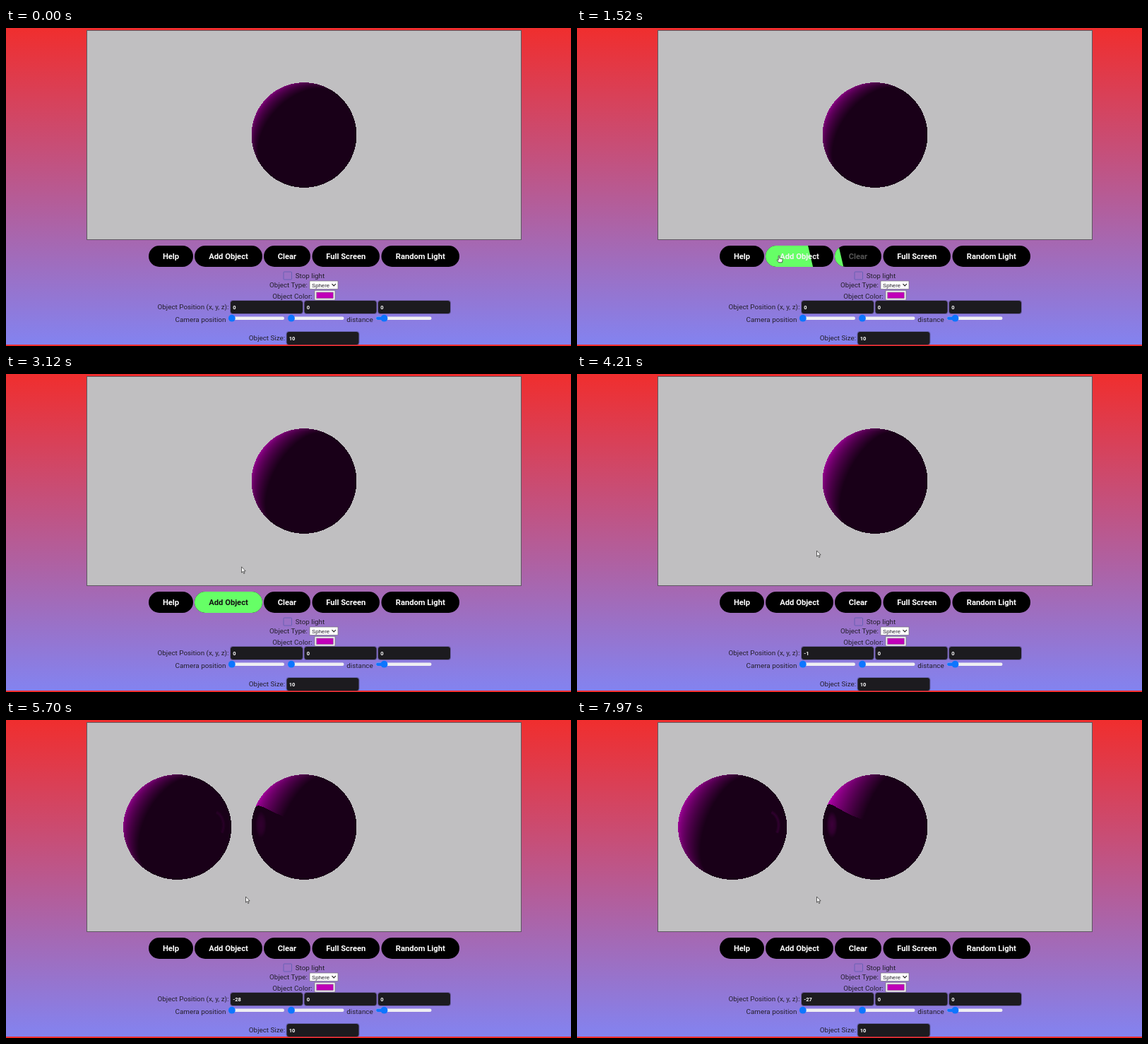
An HTML page with a canvas that plays this animation: 800 by 450 pixels, repeating every 8090 ms.

```html
<!DOCTYPE html>
<html lang="en">
<head>
<meta charset="utf-8">
<title>Sphere lighting demo</title>
<style>
  html, body { margin: 0; width: 100%; height: 100%; overflow: hidden; }
  body { background: linear-gradient(#f02e2e, #8383f0) 0 0 / 100% 448px; }
  canvas, svg { position: absolute; display: block; }
  canvas { left: 114px; top: 3px; background: #c0bfc1; border: 1px solid #5d5860; }
  svg { left: 0; top: 0; }
  text { font-family: Roboto, sans-serif; }
</style>
</head>
<body>
<canvas id="view" width="614" height="295"></canvas>
<svg id="ui" width="800" height="450" viewBox="0 0 800 450"></svg>
<script>
const LOOP = 8090;
const ui = document.getElementById('ui');
const ctx = document.getElementById('view').getContext('2d');

const clamp = v => Math.min(1, Math.max(0, v));
const ramp = (t, from, to) => clamp((t - from) / (to - from));

function add(tag, attrs, parent = ui, content) {
  const node = document.createElementNS('http://www.w3.org/2000/svg', tag);
  for (const key in attrs) node.setAttribute(key, attrs[key]);
  if (content !== undefined) node.textContent = content;
  parent.appendChild(node);
  return node;
}
const rect = (x, y, width, height, fill, more = {}) =>
  add('rect', { x, y, width, height, fill, ...more });
const text = (content, x, y, size, more = {}) =>
  add('text', { x, y, 'font-size': size, fill: '#241f2c', ...more }, ui, content);
const label = (content, center, y) =>
  text(content, center, y, 9.85, { 'text-anchor': 'middle' });

// Buttons with a slanted green fill
function makeButton(content, x, width, id) {
  const shape = { x, y: 308, width, height: 30, rx: 15 };
  add('rect', shape, add('clipPath', { id }));
  add('rect', { ...shape, fill: '#000' });
  const fill = add('path', { fill: '#66ff66', 'clip-path': `url(#${id})` });
  const caption = text(content, x + width / 2, 327, 11.2,
    { 'text-anchor': 'middle', 'font-weight': 700 });
  return (amount, lightness) => {
    const edge = x - 4 + amount * (width + 8);
    fill.setAttribute('d', amount > 0
      ? `M${x - 10} 308H${edge - 3.5}L${edge + 3.5} 338H${x - 10}Z` : '');
    const level = Math.round(18 + 237 * lightness);
    caption.setAttribute('fill', `rgb(${level},${level},${level})`);
  };
}
const helpButton = makeButton('Help', 202, 63, 'help');
const addButton = makeButton('Add Object', 267, 96, 'add');
const clearButton = makeButton('Clear', 365, 66, 'clear');
const fullButton = makeButton('Full Screen', 433.5, 95.5, 'full');
const randomButton = makeButton('Random Light', 531.5, 110.5, 'random');
for (const idle of [helpButton, fullButton, randomButton]) idle(0, 1);

// Form
rect(393, 345, 11.5, 11, 'none', { stroke: '#6860b4', rx: 1 });
label('Stop light', 430.5, 354);
label('Object Type:', 400, 366.5);
rect(430, 358, 40, 11.5, '#fff', { stroke: '#77727c', 'stroke-width': .7 });
text('Sphere', 433, 366.5, 7.8, { style: 'font-family: "Liberation Sans", sans-serif' });
add('path', { d: 'M461.5 362.2l2.7 2.7 2.7-2.7', fill: 'none', stroke: '#222', 'stroke-width': 1.2 });
label('Object Color:', 405.5, 382.5);
rect(437, 371.3, 29, 13.7, '#f0eff2', { stroke: '#77727c', 'stroke-width': .7 });
rect(439.7, 374, 23.6, 8.6, '#c000b8', { stroke: '#77727c', 'stroke-width': .5 });
label('Object Position (x, y, z):', 265, 398.3);
label('Camera position', 275.5, 415.8);
label('distance', 501, 415.8);
label('Object Size:', 369.5, 442);

function field(x, y, value) {
  rect(x - 1, y - 1, 104, 20, '#302c48', { rx: 4, opacity: .35 });
  rect(x, y, 102, 18, '#1c1b1f', { rx: 3.5 });
  return text(value, x + 3.3, y + 12.2, 7.5, { fill: '#fff', 'font-weight': 700 });
}
const xField = field(318, 386, '0');
field(422.5, 386, '0');
field(527, 386, '0');
field(397.5, 430, '10');

function slider(x, thumb) {
  rect(x, 408.5, 78.5, 4.4, '#efeff2', { rx: 2.2 });
  rect(x, 408.5, thumb - x, 4.4, '#0d75ff', { rx: 2.2 });
  add('circle', { cx: thumb, cy: 410.7, r: 4.9, fill: '#0d75ff' });
}
slider(315.5, 319.8);
slider(400, 404);
slider(524, 535.5);

// Pointer
const outline = { fill: '#fff', stroke: '#222', 'stroke-width': .7, 'stroke-linejoin': 'round' };
const arrow = add('path', { ...outline, d: 'M0 0V8.2L1.9 6.5 3.2 9.6 4.5 9 3.2 6H5.7Z' });
const hand = add('path', { ...outline,
  d: 'M-.8 .6Q0-.6 .8 .6V4L4.4 4.8Q5.3 5 5.1 6.2L4.4 9.8H-.2L-3 6.6Q-2.6 5.2-.8 6.6Z' });
const route = [[60, 800, 436], [400, 610, 395], [760, 486, 369], [1050, 421, 334],
  [1300, 363, 326], [1520, 286, 322], [2450, 286, 322], [2780, 330, 393],
  [3120, 333.5, 273], [3270, 339.5, 250], [LOOP, 339.5, 250]];

function movePointer(t) {
  const next = route.findIndex(stop => stop[0] > t);
  const visible = next > 0;
  let x = 0, y = 0;
  if (visible) {
    const [t0, x0, y0] = route[next - 1], [t1, x1, y1] = route[next];
    const k = (t - t0) / (t1 - t0);
    x = x0 + (x1 - x0) * k;
    y = y0 + (y1 - y0) * k;
  }
  const onButton = y > 307 && y < 338 && x > 267 && x < 431;
  for (const [shape, shown] of [[arrow, !onButton], [hand, onButton]]) {
    shape.setAttribute('transform', `translate(${x} ${y})`);
    shape.setAttribute('display', visible && shown ? 'inline' : 'none');
  }
}

// Key press, then key repeat, then one step back
function typedX(t) {
  if (t < 4130) return 0;
  if (t > 6100) return -27;
  return -1 - Math.min(27, Math.floor(Math.max(0, t - 4620) * .0295));
}

// Ray-traced spheres, one moving light
const FOCAL = 740, DISTANCE = 100, RADIUS = 10;
const AREA = { x: 15, y: 70, w: 375, h: 158 };
const image = ctx.createImageData(AREA.w, AREA.h);

function lightAt(t) {
  const y = .52 - .026 * t / 1000;
  const turn = (39.5 + .0045 * t) * Math.PI / 180;
  const flat = Math.sqrt(1 - y * y);
  return [-flat * Math.sin(turn), y, -flat * Math.cos(turn)];
}

function inShadow(x, y, z, center, light) {
  const dx = center - x;
  const along = dx * light[0] - y * light[1] - z * light[2];
  return along > 0 && dx * dx + y * y + z * z - along * along < RADIUS * RADIUS;
}

function drawSpheres(moved, light) {
  const centers = moved ? [0, moved] : [0];
  const data = image.data;
  data.fill(0);
  for (let j = 0; j < AREA.h; j++) {
    for (let i = 0; i < AREA.w; i++) {
      const px = AREA.x + i + .5 - 307, py = 147.5 - AREA.y - j - .5;
      const length = Math.hypot(px, py, FOCAL);
      const dx = px / length, dy = py / length, dz = -FOCAL / length;
      let near = Infinity, hit = 0;
      for (const c of centers) {
        const b = -c * dx + DISTANCE * dz;
        const disc = b * b - (c * c + DISTANCE * DISTANCE - RADIUS * RADIUS);
        if (disc < 0) continue;
        const dist = -b - Math.sqrt(disc);
        if (dist < near) { near = dist; hit = c; }
      }
      if (near === Infinity) continue;
      const x = dx * near, y = dy * near, z = DISTANCE + dz * near;
      let diffuse = ((x - hit) * light[0] + y * light[1] + z * light[2]) / RADIUS;
      if (diffuse < 0 || centers.some(c => c !== hit && inShadow(x, y, z, c, light))) diffuse = 0;
      const shade = .13 + .88 * diffuse;
      const at = (j * AREA.w + i) * 4;
      data[at] = 196 * shade;
      data[at + 2] = 188 * shade;
      data[at + 3] = 255;
    }
  }
  ctx.clearRect(0, 0, 614, 295);
  ctx.putImageData(image, AREA.x, AREA.y);
  drawReflections(moved);
}

function drawReflections(moved) {
  const strength = ramp(-moved, 18, 27);
  if (!strength) return;
  ctx.save();
  ctx.globalAlpha = strength;
  ctx.translate(246, 144);
  ctx.scale(.42, 1);
  const glow = ctx.createRadialGradient(0, 0, 0, 0, 0, 19);
  glow.addColorStop(0, 'rgba(190,0,182,.22)');
  glow.addColorStop(.6, 'rgba(190,0,182,.14)');
  glow.addColorStop(1, 'rgba(190,0,182,0)');
  ctx.fillStyle = glow;
  ctx.fillRect(-19, -19, 38, 38);
  ctx.restore();
  ctx.save();
  ctx.globalAlpha = strength;
  ctx.strokeStyle = 'rgba(190,0,182,.07)';
  for (const width of [2, 5]) {
    ctx.lineWidth = width;
    ctx.beginPath();
    ctx.ellipse(359 + moved * 7.5, 145, 14, 19, 0, -1.3, .6);
    ctx.stroke();
  }
  ctx.restore();
}

function render(t) {
  addButton(ramp(t, 1300, 1640) - ramp(t, 3150, 3600),
    1 - ramp(t, 1510, 1750) + ramp(t, 3200, 3600));
  clearButton(.6 * (ramp(t, 1060, 1290) - ramp(t, 1300, 1611)),
    1 - ramp(t, 1060, 1290) + ramp(t, 1430, 1750));
  xField.textContent = typedX(t);
  drawSpheres(typedX(t - 270), lightAt(t));
  movePointer(t);
}

const start = performance.now();
function tick() {
  render((performance.now() - start) % LOOP);
  requestAnimationFrame(tick);
}
tick();
</script>
</body>
</html>
```
